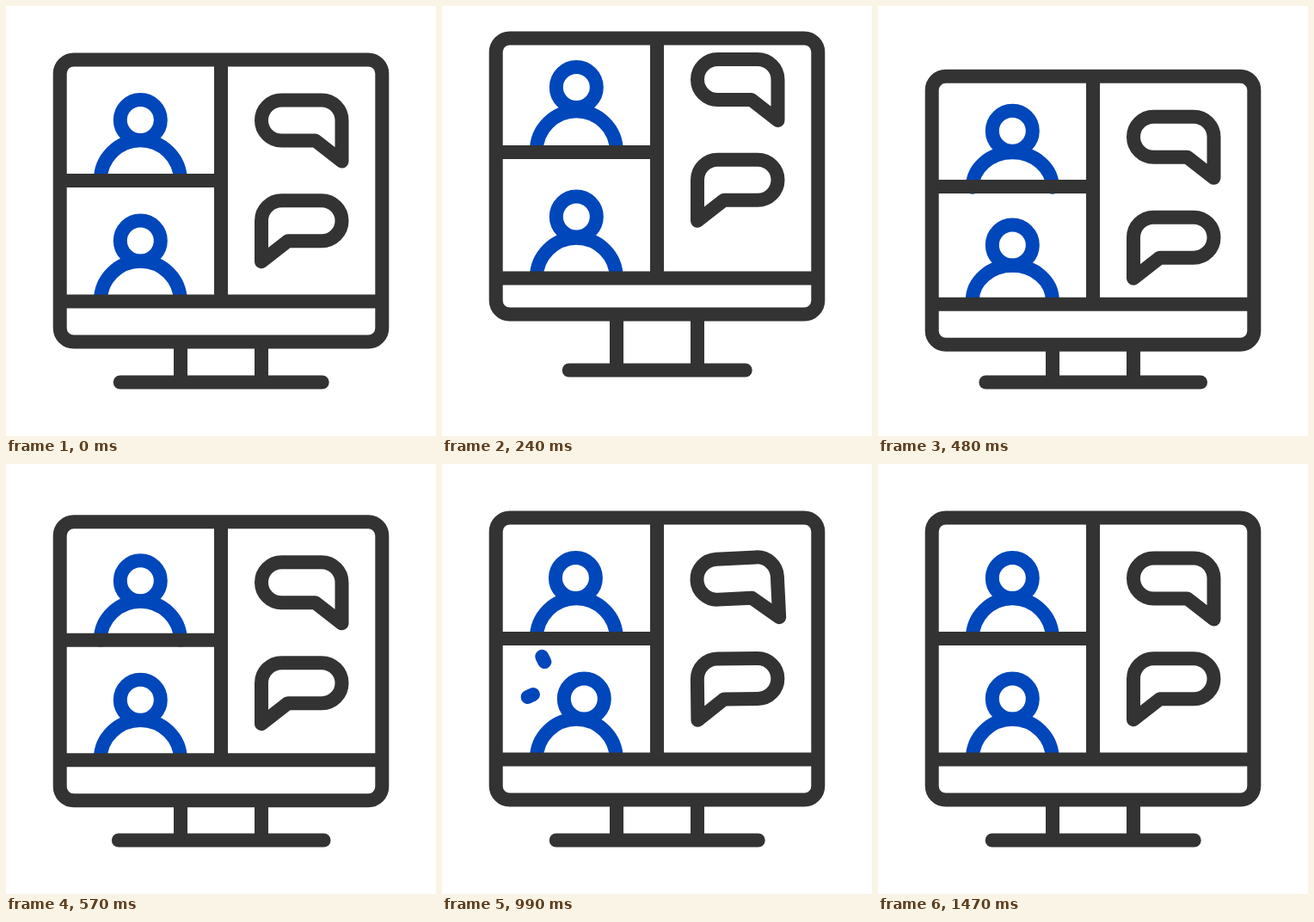
An HTML page with a canvas that plays this animation: 500 by 500 pixels, repeating every 1500 ms.

```html
<!DOCTYPE html>
<html>
<head>
<meta charset="utf-8">
<style>
  html, body { margin: 0; width: 100%; height: 100%; overflow: hidden; background: #fff; }
  canvas { display: block; width: 500px; height: 500px; }
</style>
</head>
<body>
<canvas id="stage" width="500" height="500"></canvas>
<script>
const ctx = document.getElementById('stage').getContext('2d');
const DARK = '#333', BLUE = '#0047bb';
const STEP = 30, STEPS = 50;
const HEAD_X = 156.3, HEAD_R = 23.5, BODY_R = 46.5;
let step = 0;

const clamp = (v, lo = 0, hi = 1) => Math.min(hi, Math.max(lo, v));
const ramp = (from, to) => clamp((step - from) / (to - from));

// Sum of linear moves through values that start and end at zero.
function path(times, values) {
  let last = 0, sum = 0;
  [...values, 0].forEach((v, i) => {
    sum += (v - last) * ramp(times[i], times[i + 1]);
    last = v;
  });
  return sum;
}

// Opening hop: up, down past rest, back; late is the offset on the way back.
const hop = (up, down, late = down * 2 / 3) => path([2, 8, 14, 16, 20], [up, down, late]);
// Bubble swing in degrees, one way and then the other.
const swing = (turn, first, second) => path([20, turn, turn + 14, 49], [first, second]);
// Head leaning aside between two steps.
const lean = (from, to) => 9 * ramp(from, from + 5) * (1 - ramp(to - 5, to));

function stroke(color, cap, build) {
  ctx.strokeStyle = color;
  ctx.lineCap = cap;
  ctx.beginPath();
  build();
  ctx.stroke();
}

function line(x1, y1, x2, y2, color = DARK, cap = 'butt') {
  stroke(color, cap, () => { ctx.moveTo(x1, y1); ctx.lineTo(x2, y2); });
}

// The shoulders flatten on the way down and continue straight to the floor.
function person(shift, headY, bodyTop, floor) {
  const height = BODY_R - path([8, 14, 20], [9]);
  stroke(BLUE, 'butt', () => {
    ctx.moveTo(HEAD_X - BODY_R, floor);
    ctx.ellipse(HEAD_X, bodyTop + height, BODY_R, height, 0, Math.PI, 2 * Math.PI);
    ctx.lineTo(HEAD_X + BODY_R, floor);
  });
  stroke(BLUE, 'butt', () => ctx.arc(HEAD_X + shift, headY, HEAD_R, 0, 2 * Math.PI));
}

// Two dashes flying away from a head; side -1 is left, 1 is right.
function dashes(side, headY, start, reach) {
  const age = step - start;
  const tip = Math.min(reach, 6.75 + 2.25 * age), tail = 3 + 2 * age;
  if (age <= 0 || tail >= tip) return;
  const x = HEAD_X + side * 24, y = headY - 17;
  for (const angle of [-1.107, 0.43]) {
    const dx = side * Math.cos(angle), dy = Math.sin(angle);
    line(x + dx * tail, y + dy * tail, x + dx * tip, y + dy * tip, BLUE, 'round');
  }
}

// Speech bubble with its tail at lower right, or lower left if flipped.
function bubble(y, degrees, flip) {
  ctx.save();
  ctx.translate(343.75, y);
  ctx.rotate(degrees * Math.PI / 180);
  ctx.scale(flip, 1);
  stroke(DARK, 'round', () => {
    ctx.moveTo(46.75, 35.5);
    ctx.arc(23.25, -12, HEAD_R, 0, -Math.PI / 2, true);
    ctx.arc(-23.25, -12, HEAD_R, -Math.PI / 2, Math.PI / 2, true);
    ctx.lineTo(16, 11.5);
    ctx.closePath();
  });
  ctx.restore();
}

function draw() {
  ctx.fillStyle = '#fff';
  ctx.fillRect(0, 0, 500, 500);
  ctx.lineWidth = 16;
  ctx.lineJoin = 'round';

  const top = 62.5 + hop(-25, 29), bottom = 390.5 + hop(-32, 5);
  const row = 203 + hop(-33, 5, 7), bar = 343.5 + hop(-27, 5);
  const base = 437.5 + hop(-14, 0), half = 117.5 - hop(15, -11);

  dashes(1, 132.5, 33, 29.5);
  dashes(-1, 273, 20, 37);
  person(-lean(32.5, 49), 132.5 + hop(-38, 19), 156.3 + hop(-34, 16, 14), row);
  person(lean(20, 38), 273 + hop(-28, 7.5), 296.8 + hop(-27, 7.5), bar);

  for (const x of [203, 297]) line(x, bottom, x, base);
  line(250.2 - half, base, 250.2 + half, base, DARK, 'round');
  line(62.7, row, 250, row);
  line(62.7, bar, 437.3, bar);
  line(250, top, 250, bar);
  stroke(DARK, 'butt', () => ctx.roundRect(62.7, top, 374.6, bottom - top, 16));

  const drift = hop(-47.5, 29);
  bubble(145 + drift, swing(27, -9.8, 6.5), 1);
  bubble(261.8 + drift, swing(26, 8, -9.4), -1);
}

function tick() {
  step = Math.floor(performance.now() / STEP) % STEPS;
  draw();
  requestAnimationFrame(tick);
}
tick();
</script>
</body>
</html>
```
